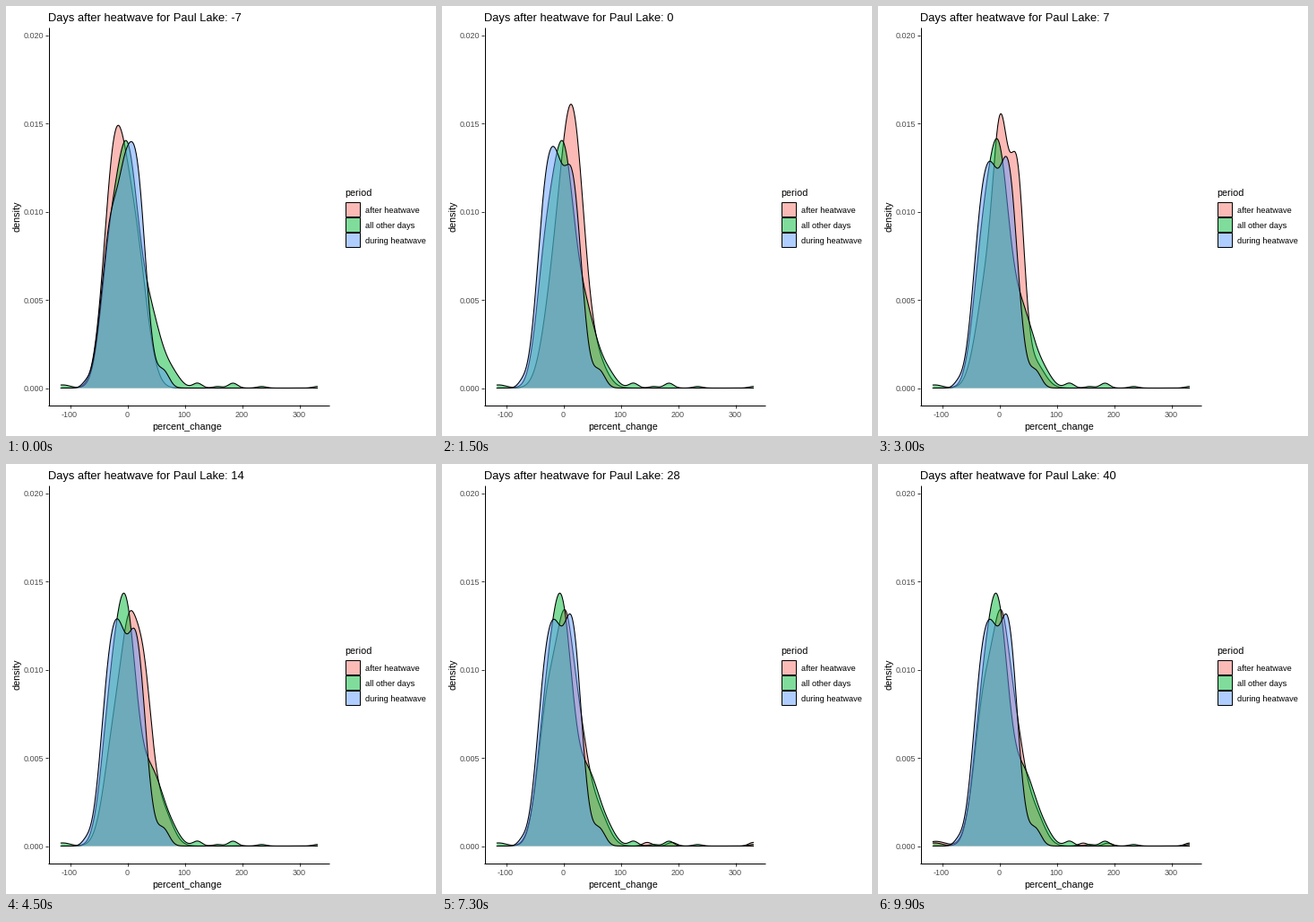
Write a matplotlib script that moves like this. It is 480 px wide and 480 px high and loops after 10 s.

```python
import numpy as np
import matplotlib
import matplotlib.pyplot as plt
from matplotlib.animation import FuncAnimation
from matplotlib.patches import Polygon, Rectangle

matplotlib.rcParams["font.family"] = "Liberation Sans"

SIZE, DPI = 480, 72
FRAMES, INTERVAL = 100, 100
FIRST_DAY, LAST_DAY = -7, 40
RED, GREEN, BLUE = "#F8766D", "#00BA38", "#619CFF"
BASE = 426.5

x = np.linspace(-115, 332, 512)


def bump(center, height, width):
    """Gaussian in percent units, height in 1e-4."""
    return height * np.exp(-0.5 * ((x - center) / width) ** 2)


def track(day, days, *values):
    return np.interp(day, days, values)


def ripples(*centers, height, width=8):
    return sum(bump(c, height, width) for c in centers)


def after(day):
    # Mass moves from a left hump to the right, splits, then settles.
    days = [-7, 0, 7, 14, 24]

    def at(*values):
        return track(day, days, *values)

    left = bump(at(-21, -16, -20, -18, -22), at(128, 48, 60, 70, 90), 19)
    crest = bump(4, at(0, 0, 122, 70, 70), 13)
    right = bump(at(14, 17, 32, 28, 26), at(78, 148, 114, 95, 66), at(20, 20, 12, 15, 17))
    shoulder = bump(62, at(0, 12, 14, 20, 18), 17)
    far = ripples(147, 190, 332, height=track(day, [14, 20, 40], 0, 2.3, 1.7))
    low = bump(-110, track(day, [28, 40], 0, 2.7), 16)
    return left + crest + right + shoulder + far + low


def other(day):
    t = track(day, [0, 14], 0, 1)
    main = bump(-31, 63 - 6 * t, 16) + bump(-2 * t, 122 + 6 * t, 18)
    shoulder = bump(38 + 6 * t, 43 - 3 * t, 21 - t) + bump(80, 6, 14)
    tail = bump(-112, 1.8, 13) + ripples(123, 185, height=2.8) + ripples(158, 235, 332, height=0.9)
    return main + shoulder + tail


def during(day):
    def at(*values):
        return track(day, [-7, 0, 7, 14, 20], *values)

    left = bump(-27, at(92, 116, 105, 107, 105), 17)
    middle = bump(at(-5, -10, -11, -11, -11), at(34, 28, 26, 26, 26), 11)
    right = bump(15.5, at(124, 117, 124, 115, 124), 16.5)
    return left + middle + right + bump(64, 9, 10) + bump(-72, 2, 7)


def px(v):
    return 135 + 0.64 * v


def py(d):
    return BASE - 1.968 * d


fig = plt.figure(figsize=(SIZE / DPI, SIZE / DPI), dpi=DPI, facecolor="white")
ax = fig.add_axes([0, 0, 1, 1])
ax.set_xlim(0, SIZE)
ax.set_ylim(SIZE, 0)
ax.axis("off")


def text(tx, ty, s, size, color="black", **kw):
    return ax.text(tx, ty, s, fontsize=size, color=color, va="baseline", **kw)


def rule(xs, ys, color="black", z=5):
    ax.plot(xs, ys, color=color, lw=1, solid_capstyle="butt", zorder=z)


# Axes
rule([47.5, 47.5], [24, 446])
rule([47, 361], [445.5, 445.5])
for v in range(-100, 301, 100):
    rule([px(v) + 0.5] * 2, [445, 449], "#333333", 4)
    text(px(v), 459, str(v), 9, "#4D4D4D", ha="center")
for i in range(5):
    y = py(50 * i)
    rule([44, 47], [y, y], "#333333", 4)
    text(42.5, y + 3.5, f"{0.005 * i:.3f}", 9, "#4D4D4D", ha="right")
text(201.7, 473, "percent_change", 10.7, ha="center")
ax.text(12, 235, "density", fontsize=10.7, rotation=90, ha="center", va="center")
title = text(47, 17, "", 12.9)

# Legend and density areas, back to front
text(378, 212, "period", 10.8)
layers = []
for k, (name, curve, color) in enumerate([("after heatwave", after, RED),
                                          ("all other days", other, GREEN),
                                          ("during heatwave", during, BLUE)]):
    top = 218.5 + 17 * k
    ax.add_patch(Rectangle((378.5, top), 16, 16, fc=color, alpha=0.5, lw=0))
    ax.add_patch(Rectangle((378.5, top), 16, 16, fill=False, ec="black", lw=1))
    text(401, top + 12.5, name, 9.2)

    area = Polygon([(0, 0), (1, 0), (1, 1)], fc=color, alpha=0.5, lw=0, zorder=2 + 0.2 * k)
    ax.add_patch(area)
    line, = ax.plot([], [], color="black", lw=1.07, zorder=2.1 + 0.2 * k)
    layers.append((curve, area, line))

xs = px(x)


def update(i):
    day = FIRST_DAY + (LAST_DAY - FIRST_DAY) * i / (FRAMES - 1)
    title.set_text(f"Days after heatwave for Paul Lake: {round(day)}")
    for curve, area, line in layers:
        ys = py(curve(day))
        line.set_data(xs, ys)
        area.set_xy(np.column_stack([np.r_[xs, xs[-1], xs[0]], np.r_[ys, BASE, BASE]]))
    return [title] + [a for layer in layers for a in layer[1:]]


anim = FuncAnimation(fig, update, frames=FRAMES, interval=INTERVAL,
                     repeat=True, repeat_delay=0, blit=False)
plt.show()
```
